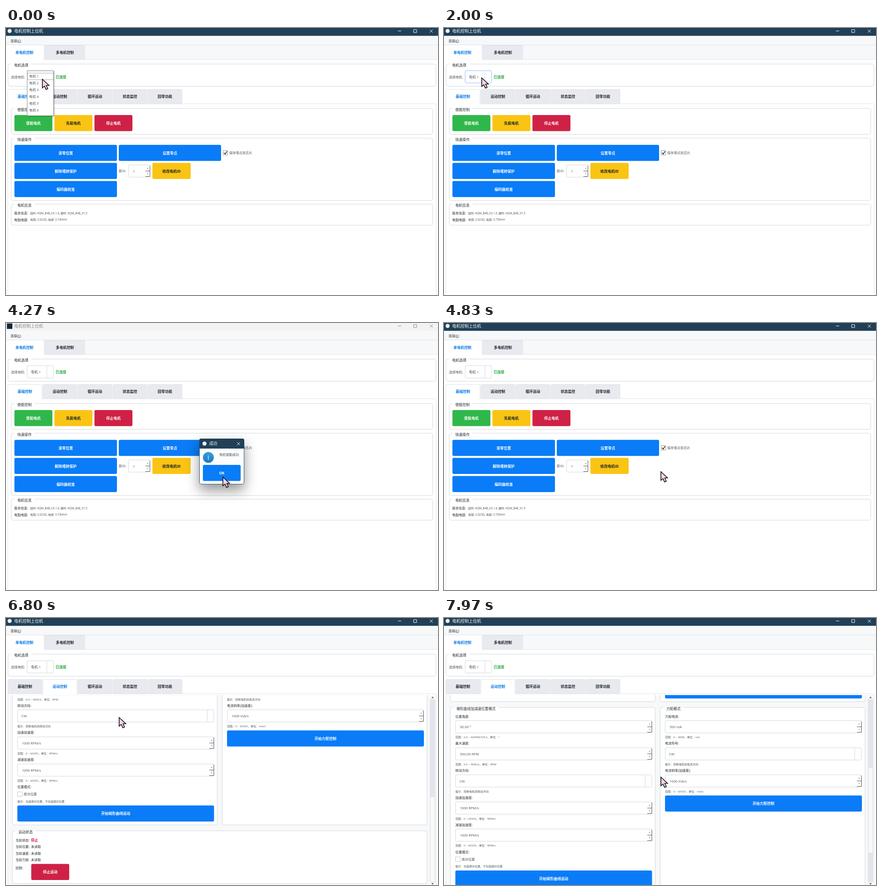
Animation of 950 by 589 pixels, one loop 8 s. Source, as an HTML page:

```html
<!DOCTYPE html>
<html>
<head>
<meta charset="utf-8">
<title>电机控制</title>
<style>
html, body { margin: 0; width: 100%; height: 100%; overflow: hidden; background: #fff; }
svg { display: block; width: 950px; height: 589px; }
text { font-family: "Open Sans", "Noto Sans CJK SC", "Noto Sans CJK", sans-serif; white-space: pre; }
#dialog { filter: drop-shadow(0 13px 14px rgba(0, 0, 0, .42)); }
</style>
</head>
<body>
<svg id="stage" viewBox="0 0 950 589"></svg>
<script>
const BLUE = '#0a7cf7', GREEN = '#30b74b', YELLOW = '#f9c413', RED = '#cf2146';
const NAVY = '#214057', INK = '#212529', GREY = '#495057', LINE = '#d3d7dc', PALE = '#f7f8f9';
const LOOP = 8000;

// ---- drawing helpers: rectangles by their edges, text by its vertical middle
const rect = (x, y, x2, y2, fill, stroke = 'none', r = 0, id = '') =>
  `<rect ${id && `id="${id}"`} x="${x}" y="${y}" width="${x2 - x}" height="${y2 - y}" rx="${r}" fill="${fill}" stroke="${stroke}"/>`;
const path = (d, stroke, width = 1, fill = 'none') =>
  `<path d="${d}" stroke="${stroke}" stroke-width="${width}" fill="${fill}"/>`;
const text = (x, y, s, size = 7.2, fill = GREY, weight = 400, anchor = 'start') =>
  `<text x="${x}" y="${y + size * .37}" font-size="${size}" fill="${fill}" font-weight="${weight}" text-anchor="${anchor}">${s}</text>`;
const group = (id, body, attrs = '') => `<g id="${id}" ${attrs}>${body}</g>`;

const button = (x, y, x2, label, fill = BLUE, id) =>
  rect(x, y, x2, y + 35.5, fill, 'none', 3, id) +
  text((x + x2) / 2, y + 18, label, 8, fill === YELLOW ? INK : '#fff', 700, 'middle');

const frame = (x, y, x2, y2, title) =>
  rect(x, y, x2, y2, '#fff', LINE, 4) +
  rect(x + 6.5, y - 1, x + 20.5 + title.length * 7.8, y + 1, '#fff') +
  text(x + 13.5, y + 2.7, title, 7.8, INK, 500);

const spin = (x, cy, x2, value) =>
  rect(x + .5, cy - 13.5, x2 - .5, cy + 13.5, '#fff', LINE, 2) +
  text(x + 10, cy + .3, value, 7.6) +
  path(`M${x2 - 10.5} ${cy}h10M${x2 - 10.5} ${cy + 12}h10v-24`, '#555') +
  path(`M${x2 - 6.5} ${cy - 6}h2m-2 12h2`, '#333');

const combo = (x, cy, x2, value, id) =>
  rect(x + .5, cy - 13.5, x2 - .5, cy + 13.5, '#fff', LINE, 2, id) +
  path(`M${x2 - 15} ${cy - 13}v26`, LINE) +
  text(x + 9, cy + .3, value, 7.5);

const checkbox = (x, cy, label, on) =>
  rect(x + .5, cy - 5, x + 10.5, cy + 5, '#fff', on ? '#999' : '#c4c8cc') +
  (on ? path(`M${x + 2.5} ${cy}l2.5 3 4-6.5`, '#111', 1.4) : '') +
  text(x + 14, cy, label);

const titleBar = (id, bg, fg, icon) => group(id,
  rect(0, 0, 950, 17.5, bg) + icon +
  text(18, 6.5, '电机控制上位机', 9.1, fg) +
  path('M862 6.5h7M896.5 3.5h6.5v6.5h-6.5zM932 3.5l6.5 6.5m0-6.5l-6.5 6.5', fg));

const subTabs = active => ['基础控制', '运动控制', '循环运动', '状态监控', '回零功能'].map((s, i) => {
  const x = 4 + i * 77, on = i === active;
  return rect(x, 135.5, x + 75, on ? 168 : 167, on ? '#fff' : '#e8eaef', '#dfe2e6', 2, on ? 'tab' + i : '') +
    (on ? rect(x + .6, 166, x + 74.4, 169, '#fff') : '') +
    text(x + 37.5, 151.2, s, 8, on ? '#0a7be8' : INK, 700, 'middle');
}).join('');
const pane = rect(4, 167, 946, 600, '#fff', '#dfe2e6', 3);

// ---- window
const dot = (x, y) => `<circle cx="${x}" cy="${y}" r="4.5" fill="#e9eef2"/>`;

const shell =
  titleBar('active', NAVY, '#fff', dot(8, 6.5)) +
  titleBar('inactive', '#f3f3f3', '#858585', rect(2, 1, 14, 13, '#14293c')) +
  rect(0, 17.5, 950, 69.5, PALE) +
  text(10, 28, '连接(<tspan text-decoration="underline">C</tspan>)', 7.2, INK) +
  path('M0 37.5H950M0 69.5H950', '#e1e4e7') +
  rect(0, 38, 83.5, 70, '#fff') + path('M83.5 38v31', '#e1e4e7') +
  rect(85.5, 38, 173, 69.5, '#e8eaef', '#dfe2e6', 2) +
  text(40.5, 53.7, '单电机控制', 7.9, '#0a7be8', 700, 'middle') +
  text(129.5, 53.7, '多电机控制', 7.9, INK, 700, 'middle') +
  frame(4.5, 79.5, 945.5, 128.5, '电机选择') +
  text(11, 108, '选择电机:') +
  combo(46, 107.7, 105, '电机 1', 'motor') +
  text(109, 108, '已连接', 7.9, '#22a83a', 700);

const basicPage = pane + subTabs(0) +
  frame(11.5, 177.5, 938.5, 234.5, '使能控制') +
  button(18.5, 192, 102, '使能电机', GREEN) +
  button(106.5, 192, 190, '失能电机', YELLOW) +
  button(194.5, 192, 278, '停止电机', RED) +
  frame(11.5, 243, 938.5, 380.5, '快速操作') +
  button(18.5, 257.7, 244, '清零位置') +
  button(248, 257.7, 473, '设置零点') +
  checkbox(477, 275.3, '保存零点到芯片', true) +
  button(18.5, 297.6, 244, '解除堵转保护') +
  text(248, 315.5, '新ID:') +
  spin(269, 315.5, 317, '1') +
  button(322, 297.6, 406, '修改电机ID', YELLOW) +
  button(18.5, 337.6, 244, '编码器校准') +
  frame(11.5, 388.5, 938.5, 435, '电机信息') +
  text(18, 408.5, '版本信息:', 7.2, INK) +
  text(53, 408.5, '固件: KQM_B48_V3.1.6, 硬件: KQM_B48_V1.5', 6.2) +
  text(18, 423, '电阻电感:', 7.2, INK) +
  text(53, 423, '电阻: 2.023Ω, 电感: 3.730mH', 6.2);

// ---- scrolling page
const fields = (x, rows) => rows.map(([label, value, hint], i) => {
  const y = 217 + i * 59.75;
  return text(x, y, label + ':', 7.2, INK) +
    (value === 'CW' ? combo : spin)(x, y + 23, x + 432.5, value) +
    text(x, y + 46, hint, 6.1);
}).join('');
const range = (max, unit) => `范围：${max}，单位：${unit}`;
const ramp = unit => range('0 ~ 65535', unit);

const status = ['状态', '位置', '速度', '力矩'].map((s, i) => {
  const y = 633.5 + i * 14.5;
  return text(21, y, `当前${s}:`, 7.2, INK) +
    (i ? text(55, y, '未读取', 7.2, INK) : text(55, y, '停止', 7.8, '#c8193c', 700));
}).join('');

const content =
  rect(14, 100, 464.5, 184.5, '#fff', LINE, 4) +
  rect(475.5, 100, 926, 184.5, '#fff', LINE, 4) +
  button(486, 142, 919, '') +
  frame(14, 197.5, 464.5, 600, '梯形曲线加减速位置模式') +
  fields(25, [
    ['位置角度', '90.00 °', range('0.0 ~ 429496729.5', '°')],
    ['最大速度', '500.00 RPM', range('0.0 ~ 3000.0', 'RPM')],
    ['转动方向', 'CW', '提示：控制电机的转动方向'],
    ['加速加速度', '1000 RPM/s', ramp('RPM/s')],
    ['减速加速度', '1000 RPM/s', ramp('RPM/s')]]) +
  text(25, 516, '位置模式:', 7.2, INK) +
  checkbox(25, 532, '绝对位置') +
  text(25, 548, '提示：勾选绝对位置，不勾选相对位置', 6.1) +
  button(25, 557, 457.5, '开始梯形曲线运动') +
  frame(475.5, 197.5, 926, 600, '力矩模式') +
  fields(486, [
    ['力矩电流', '500 mA', range('0 ~ 4000', 'mA')],
    ['电流符号', 'CW', '提示：控制电机的电流方向'],
    ['电流斜率(加速度)', '1000 mA/s', ramp('mA/s')]]) +
  button(486, 391.5, 919, '开始力矩控制') +
  frame(14, 613, 926, 729, '运动状态') + status +
  text(21, 695, '控制:', 7.2, INK) +
  button(55.5, 686, 139, '停止运动', RED);

const motionPage = pane + subTabs(1) +
  rect(5, 170, 945, 589, PALE) +
  `<g clip-path="url(#view)">${group('content', content)}</g>` +
  rect(932.5, 170, 943.5, 589, PALE) +
  rect(933, 180, 943, 582, '#e3e5ea', '#d8dbe0') +
  rect(933, 394, 943, 582, '#f8f9fa', '#dcdfe3', 0, 'handle') +
  path('M935.5 176.5h5l-2.5-3zM935.5 585h5l-2.5 3z', 'none', 0, '#444');

// ---- overlays
const dropdown =
  rect(47, 95, 107, 195.5, '#0003') +
  rect(46.5, 94.5, 104.5, 193.5, '#fff', '#8e8e8e') +
  rect(47, 99.5, 104, 114, '#fff', '#a5a5a5') +
  [1, 2, 3, 4, 5, 6].map(n => text(51, 91.7 + n * 15, '电机 ' + n, 7.4)).join('');

const dialog =
  rect(425.5, 255.5, 523.5, 355.5, '#fbfcfc', '#35536a', 4) +
  path('M425 277v-18q0-4 4-4h91q4 0 4 4v18z', 'none', 0, NAVY) +
  dot(436.5, 266) +
  text(447, 266, '成功', 8.8, '#fff') +
  path('M508 263l6.5 6.5m0-6.5l-6.5 6.5', '#fff') +
  '<circle cx="445" cy="296.5" r="12" fill="url(#info)"/>' +
  text(445, 296.5, 'i', 15, '#fff', 400, 'middle') +
  text(469, 290.3, '电机使能成功') +
  button(433, 313, 516, 'OK', BLUE, 'ok');

stage.innerHTML = `<defs>
  <clipPath id="view"><rect x="5" y="170" width="926" height="419"/></clipPath>
  <clipPath id="reveal"><rect id="shade" x="40" y="90" width="75" height="110"/></clipPath>
  <linearGradient id="info" x2="0" y2="1"><stop stop-color="#3aa0dd"/><stop offset="1" stop-color="#1878bd"/></linearGradient>
  </defs>` + shell +
  group('basic', basicPage) + group('motion', motionPage) +
  group('list', dropdown, 'clip-path="url(#reveal)"') +
  group('dialog', dialog) +
  group('pointer', path('M0 0V19L4.6 15.2 8 22.7 11.8 21 8.6 13.7H14.6Z', '#111', 1.6, '#fbd3ee'));

// ---- timeline
// pointer moves: start, end, x, y
const moves = [
  [0, 1, 80, 113], [630, 700, 185, 190], [900, 1070, 83, 110],
  [2700, 2770, 212, 110], [2970, 3130, 71, 219], [3900, 4270, 477, 340],
  [4500, 4530, 477, 328], [4840, 5100, 97, 156], [6170, 6200, 108, 153],
  [6670, 7030, 576, 374], [7230, 7300, 500, 389], [7670, 7730, 497, 390],
  [7930, 7970, 477, 351]];
const $ = id => document.getElementById(id);
const clamp = v => Math.max(0, Math.min(1, v));
const show = (id, on) => $(id).style.display = on ? '' : 'none';

function pointerAt(t) {
  let [, , x, y] = moves[0];
  for (const [a, b, tx, ty] of moves) {
    let k = clamp((t - a) / (b - a));
    k *= k * (3 - 2 * k);
    x += (tx - x) * k;
    y += (ty - y) * k;
  }
  return `translate(${x} ${y})`;
}

function draw(now) {
  const t = now % LOOP;
  const modal = t >= 3770 && t < 4770;
  const onMotion = t >= 5500;
  const scroll = t < 7230 ? 0 : t < 7430 ? 71.75 : 143.5;

  show('active', !modal);
  show('inactive', modal);
  show('basic', !onMotion);
  show('motion', onMotion);
  show('list', t < 660 || (t >= 1470 && t < 1970));
  $('shade').setAttribute('height', t < 1470 ? 110 : 110 * clamp((t - 1450) / 200));
  $('motor').setAttribute('stroke', t < 3050 ? '#8fbdf0' : LINE);

  show('dialog', t >= 3770 && t < 4830);
  $('dialog').style.opacity = 1 - clamp((t - 4770) / 60);
  $('ok').setAttribute('fill', t >= 4500 ? '#0a6ee0' : BLUE);

  $('tab1').setAttribute('fill', t < 6700 ? PALE : '#fff');
  $('content').setAttribute('transform', `translate(0 ${scroll - 143.5})`);
  $('handle').setAttribute('y', 394 - scroll * .446);
  $('pointer').setAttribute('transform', pointerAt(t));
  requestAnimationFrame(draw);
}
requestAnimationFrame(draw);
</script>
</body>
</html>
```
